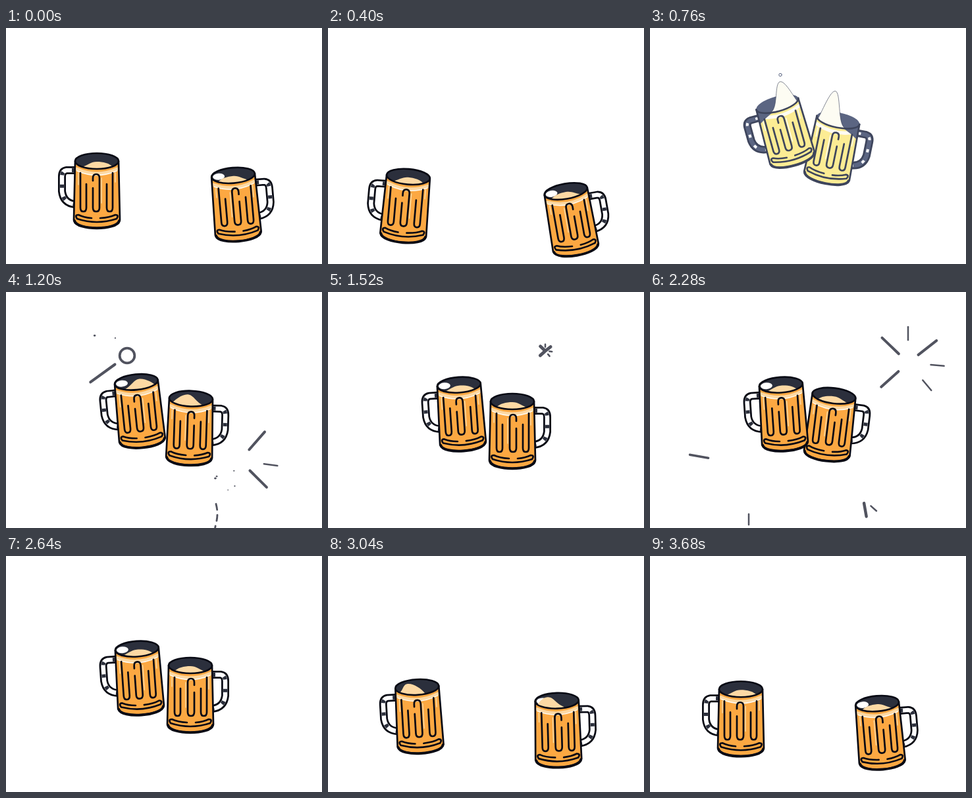
These frames come from a looping animation (480x360 px, 3720 ms). An HTML page with a canvas:

```html
<!DOCTYPE html>
<html>
<head>
<meta charset="utf-8">
<style>
html, body { margin: 0; width: 100%; height: 100%; overflow: hidden; background: #fff; }
canvas { display: block; }
</style>
</head>
<body>
<canvas id="stage" width="480" height="360"></canvas>
<script>
const ctx = document.getElementById('stage').getContext('2d');
const LOOP = 3720;
const GREY = '#51535f';

// side is 1 for the left mug and -1 for its mirror image
const left = { side: 1, rest: [138, 249, 0], raised: [202, 187, -4], splash: 34, nudge: 0 };
const right = { side: -1, rest: [349, 270, -5], raised: [280, 213, 0], splash: 45, nudge: 1 };

const radians = deg => deg * Math.PI / 180;
const random = n => Math.abs(Math.sin(n * 127.1) * 43758.5) % 1;
const mix = (a, b, k) => `rgb(${a.map((v, i) => Math.round(v + (b[i] - v) * k))})`;

function ease(t, from, to) {
  const k = Math.min(1, Math.max(0, (t - from) / (to - from)));
  return (1 - Math.cos(Math.PI * k)) / 2;
}

const pulse = (t, a, b, c, d) => ease(t, a, b) - ease(t, c, d);

function progress(t, start, length) {
  const k = (t - start) / length;
  return k > 0 && k < 1 ? k : 0;
}

function pose(m, t) {
  const windup = pulse(t, 0, 400, 480, 730);
  const lift = pulse(t, 480, 730, 2760, 2960);
  const hit = pulse(t, 480, 730, 780, 1350);
  const nudge = m.nudge * pulse(t, 2120, 2280, 2280, 2440);
  // landing: a damped spring
  const s = Math.max(0, t - 2960), damp = Math.exp(-s / 200), swing = s * Math.PI / 120;
  const bounce = ease(t, 2760, 2960) * damp * Math.cos(swing);
  const sway = damp * Math.sin(swing);

  const [x, y, tilt] = m.rest.map((v, i) => v + (m.raised[i] - v) * lift);
  return {
    x: x + m.side * (3 * hit - 20 * windup + 6 * nudge),
    y: y + 23 * windup - 29 * hit - 10 * nudge + 10 * bounce,
    tilt: tilt + m.side * (5 * windup - 11.5 * hit - 7 * nudge - 6 * sway),
    peak: 13 * Math.sqrt(Math.max(0, hit)) - m.side * 24 * sway,
    top: 1 - m.splash * hit - 12 * Math.abs(sway)
  };
}

function stroke(d, color, width) {
  ctx.strokeStyle = color;
  ctx.lineWidth = width;
  ctx.stroke(new Path2D(d));
}

function fill(d, color) {
  ctx.fillStyle = color;
  ctx.fill(new Path2D(d));
}

function ellipse(x, y, rx, ry, color) {
  ctx.beginPath();
  ctx.ellipse(x, y, rx, ry, 0, 0, 7);
  ctx.fillStyle = color;
  ctx.fill();
}

function ring(x, y, r, color, width) {
  ctx.beginPath();
  ctx.arc(x, y, r, 0, 7);
  ctx.strokeStyle = color;
  ctx.lineWidth = width;
  ctx.stroke();
}

const groove = (l, r, topL, topR) => `M${l} ${topL}V25Q${l} 31 ${(l + r) / 2} 31T${r} 25V${topR}`;
const HANDLE = 'M-33-32H-46Q-53-31-53-22V0Q-51 18-33 20';
const BODY = 'M-33-46L-35 44C-32 60 32 60 35 44L33-46Z';
const RIM = 'M-33-46a33 12 0 0 1 66 0a33 12 0 0 1-66 0Z';
const FRONT = 'M-33-46a33 12 0 0 0 66 0';
const SMILE = 'M-8 41Q-20 40-28 36Q-34 36-30 42Q0 52 30 42Q34 36 28 36Q20 40 5 41';
const LINES = groove(-25, -16, -28, -11) + groove(-6, 4, -5, -20) + 'Q4-26-1-26T-6-20V-16' +
  groove(15, 24, -11, -28) + SMILE;

function mug(m, t) {
  const { x, y, tilt, peak, top } = pose(m, t);
  const flash = pulse(t, 660, 740, 780, 900);
  const tone = (base, lit) => mix(base, lit, flash);
  const line = tone([8, 10, 20], [62, 69, 92]);
  const glass = tone([43, 47, 60], [91, 101, 130]);
  const beer = tone([252, 168, 66], [252, 236, 148]);
  const foam = tone([253, 217, 164], [253, 252, 243]);
  const splashing = top < -8;

  ctx.save();
  ctx.translate(x, y);
  ctx.rotate(radians(tilt));
  ctx.scale(m.side, 1 - Math.abs(tilt) * .003);
  ctx.lineCap = 'butt';
  stroke(HANDLE, line, 12);
  stroke(HANDLE, tone([255, 255, 255], [91, 101, 130]), 6.5);
  ctx.setLineDash([5, 14]);
  stroke(HANDLE, tone([43, 47, 60], [255, 255, 255]), 6 - 2 * flash);
  ctx.setLineDash([]);
  ctx.lineCap = ctx.lineJoin = 'round';

  fill(BODY, beer);
  stroke('M-31-34Q0-20 31-34', foam, 5);
  stroke('M-30-31Q0-18 30-31', '#fffaf0', 1.5);
  stroke('M-28-28V-10M7-20V18M28-28V-14', foam, 1.5);
  if (splashing) fill('M-33-46V-22L-24-28L-8-36Z', glass);
  stroke(LINES, line, 2.7);
  stroke(BODY, line, 2.7);
  stroke('M-34 45C-31 60 31 60 34 45', line, 4);

  fill(RIM, glass);
  const raised = t > 1000 && t < 2860;
  if (!flash && raised === (m.side > 0)) ellipse(-22 * m.side, -46, 9, 5, '#fff');

  // foam stays inside the rim below but may rise above it
  ctx.save();
  ctx.clip(new Path2D('M-33-110V-46a33 12 0 0 0 66 0V-110Z'));
  const l = Math.max(-32, peak - 25), r = Math.min(33, peak + 25), h = top - 46;
  const wave = `M${l}-36C${l + 12}-40 ${peak - 9} ${h} ${peak} ${h}S${r - 5}-43 ${r}-36Q${(l + r) / 2}-30 ${l}-36Z`;
  fill(wave, foam);
  if (splashing) stroke(wave, line, .6);
  ctx.restore();
  stroke(splashing ? FRONT : RIM, line, 2.7);
  ctx.restore();
}

// strong and weak rays take turns
const STAR = [224, 270, 322, 5, 138, 50];

function burst(t, start, length, x, y, reach, angles = STAR) {
  const k = progress(t, start, length);
  if (!k) return;
  angles.forEach((deg, i) => {
    const weak = i % 2, c = Math.cos(radians(deg)), s = Math.sin(radians(deg));
    const a = reach * k ** (weak ? .8 : 1.5), b = reach * (1 - (1 - k) ** 3);
    stroke(`M${x + c * a} ${y + s * a}L${x + c * b} ${y + s * b}`, GREY, weak ? 2.5 : 5 - 2 * k);
  });
}

function spray(t, start, length, x, y, reach, count) {
  const k = progress(t, start, length);
  if (!k) return;
  for (let i = 0; i < count; i++) {
    const angle = i * 2.4 + random(i + x), far = reach * (.5 + k) * (.6 + .4 * random(i + y));
    const size = reach * (.04 + .05 * random(i + 1));
    ellipse(x + far * Math.cos(angle), y + far * Math.sin(angle) + 30 * (k - .5), size, size * .85, GREY);
  }
}

function rocket(t, start, end, x, color) {
  if (t < start || t > end) return;
  ctx.setLineDash([9, 8]);
  stroke(`M${x} ${360 - (t - start) * .72}q4 15 0 30t0 30t-1 25`, color, 2.8);
  ctx.setLineDash([]);
}

function sparks(t) {
  ctx.lineCap = 'round';
  rocket(t, 1150, 1500, 319, GREY);
  rocket(t, 1720, 1880, 163, '#695338');
  rocket(t, 1770, 2120, 391, GREY);

  burst(t, 1060, 300, 355, 257, 68, [-49, 8, 45]);
  burst(t, 1060, 340, 184, 97, 86, [144]);
  burst(t, 1500, 320, 330, 90, 56);
  burst(t, 1880, 520, 150, 264, 92, [190, 90]);
  burst(t, 2120, 360, 392, 108, 66);
  burst(t, 2200, 300, 324, 316, 44, [80, 42]);

  spray(t, 1060, 280, 333, 287, 22, 5);
  spray(t, 1060, 280, 153, 56, 22, 2);
  spray(t, 1640, 400, 145, 215, 52, 6);

  const circle = progress(t, 1100, 220);
  if (circle) ring(184, 97, 4 + 16 * circle, GREY, 7 * (1 - circle));
  const drop = progress(t, 720, 180);
  if (drop) ring(198, 71 + 90 * (drop - .3) ** 2, 2.2, '#5b6582', 1);
}

function draw(t) {
  ctx.fillStyle = '#fff';
  ctx.fillRect(0, 0, 480, 360);
  sparks(t);
  mug(right, t);
  mug(left, t);
}

const begin = performance.now();
function tick() {
  draw((performance.now() - begin) % LOOP);
  requestAnimationFrame(tick);
}
tick();
</script>
</body>
</html>
```
